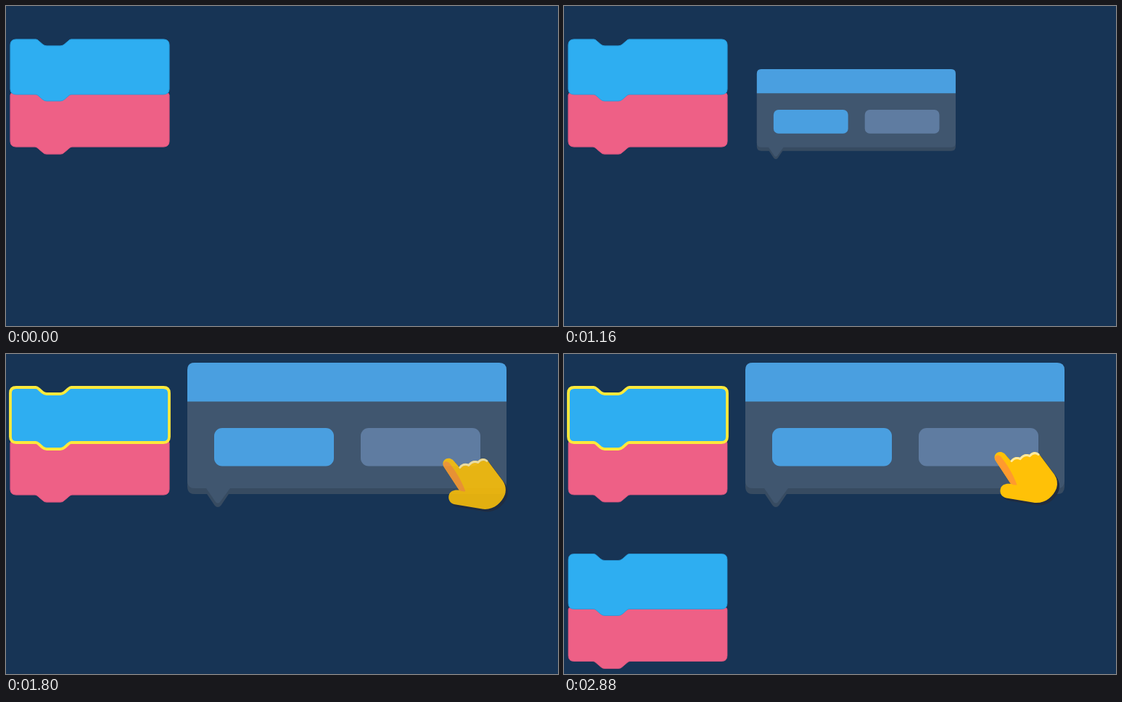
An HTML page that plays this animation: 761x441 px, repeating every 3.32 s.

```html
<!DOCTYPE html>
<html lang="en">
<head>
<meta charset="utf-8">
<title>Duplicating blocks</title>
<style>
  html, body { margin: 0; width: 100%; height: 100%; overflow: hidden; background: #173455; }
  svg { display: block; width: 761px; height: 441px; }
</style>
</head>
<body>
<svg viewBox="0 0 761 441">
  <defs>
    <path id="block" d="M14 46H41q2 0 4 2l5 4.500q3 2.500 6 2.500H75q3 0 6-2.500l5-4.500q2-2 4-2H217q8 0 8 8V114q0 8-8 8H90q-2 0-4 2l-5 4.500q-3 2.500-6 2.500H56q-3 0-6-2.500l-5-4.500q-2-2-4-2H14q-8 0-8-8V54q0-8 8-8Z"/>
    <g id="stack">
      <path fill="#ee6086" stroke="#d4557f" stroke-width=".8" d="M9 120H222q3 0 3 3V186q0 8-8 8H91q-2 0-4 2l-7 6q-2 2-5 2H56q-3 0-5-2l-7-6q-2-2-4-2H14q-8 0-8-8V123q0-3 3-3Z"/>
      <use href="#block" fill="#2eaef1" stroke="#2698d8" stroke-width=".8"/>
    </g>
    <path id="palm" d="M186 102C181 94 190 86 198 92L207 102Q212 95 220 98Q226 91 233 94Q239 87 246 93L267 121Q273 130 270 140C265 152 255 161 240 160L201 153.500C194 152 191 146 193 140C195 135 200 133 207 134Z"/>
    <g id="hand">
      <use href="#palm" x="3" y="3.500" fill="#202c40"/>
      <use href="#palm" fill="#ffc107"/>
      <path fill="none" stroke="#ffeaa0" stroke-width="3" stroke-linecap="round" d="M208 102.500Q213 96.500 220 99.500Q226 92.500 233 95.500Q239 89 245 93.500"/>
      <path fill="#ff9a2e" d="M186 102C183 96 188 92 193 96C201 106 210 120 215.500 135.500Q211 136 207 134Z"/>
    </g>
  </defs>

  <use href="#stack"/>
  <use id="copy" href="#stack"/>
  <use id="glow" href="#block" fill="none" stroke="#ffea3b" stroke-width="3.800"/>

  <g id="popup">
    <path fill="#374b61" d="M260 12H680q10 0 10 10V183q0 10-10 10H307L296.500 208.500Q292 213.500 287.500 208.500L277 193H260q-10 0-10-10V22q0-10 10-10Z"/>
    <path fill="#40566f" d="M250 60H690V175q0 10-10 10H309L295 204Q292 207 289 204L276 185H260q-10 0-10-10Z"/>
    <path fill="#4a9fe0" d="M250 65.500V22q0-10 10-10H680q10 0 10 10V65.500Z"/>
    <rect x="287" y="102" width="165" height="52.500" rx="11" fill="#4a9fe0"/>
    <rect x="489" y="102" width="165" height="52.500" rx="11" fill="#5f7ca1"/>
  </g>

  <circle id="outer" fill="#d3f1ff"/>
  <circle id="inner" fill="#d3f1ff"/>
  <use id="pointer" href="#hand"/>
</svg>
<script>
  const LOOP = 3320, STEP = 40;
  const el = id => document.getElementById(id);
  const set = (id, attrs) => {
    for (const k in attrs) el(id).setAttribute(k, attrs[k]);
  };
  const span = (t, start, length) => Math.min(1, Math.max(0, (t - start) / length));
  const smooth = u => u * u * (3 - 2 * u);
  const cubic = u => u < .5 ? 4 * u ** 3 : 1 - 4 * (1 - u) ** 3;
  const backOut = u => 1 + 2 * (u - 1) ** 3 + (u - 1) ** 2;

  function ring(id, t, x, y) {
    const u = span(t, 0, 440);
    const alpha = u > 0 ? Math.min(.85, Math.max(0, 1.8 * (1 - u) - .49)) : 0;
    set(id, { cx: x, cy: y, r: 38 * (1 - (1 - u) ** 2), opacity: alpha });
  }

  function draw(t) {
    const second = t > 1300;
    const [dx, dy] = second ? [409, 45] : [0, 0];
    const enter = smooth(span(t, second ? 1550 : 30, 320));
    const leave = second ? 0 : smooth(span(t, 1000, 140));
    const away = 72 * (1 - enter);
    set('pointer', {
      transform: `translate(${dx + away} ${dy + away})`,
      opacity: enter * (1 - leave)
    });
    set('glow', { opacity: span(t, 280, 120) * (1 - leave) });

    const click = t - (second ? 2054 : 572);
    ring('outer', click, 192.5 + dx, 98.5 + dy);
    ring('inner', click - 106, 192.5 + dx, 98.5 + dy);

    // The panel grows out of the tip of its tail.
    const size = backOut(span(t, 1095, 320));
    set('popup', { transform: `translate(292 211) scale(${size}) translate(-292 -211)` });

    set('copy', { transform: `translate(0 ${229.5 * cubic(span(t, 2380, 490))})` });
  }

  const begin = performance.now();
  function tick() {
    const t = (performance.now() - begin) % LOOP;
    draw(Math.floor(t / STEP) * STEP);
    requestAnimationFrame(tick);
  }
  tick();
</script>
</body>
</html>
```
